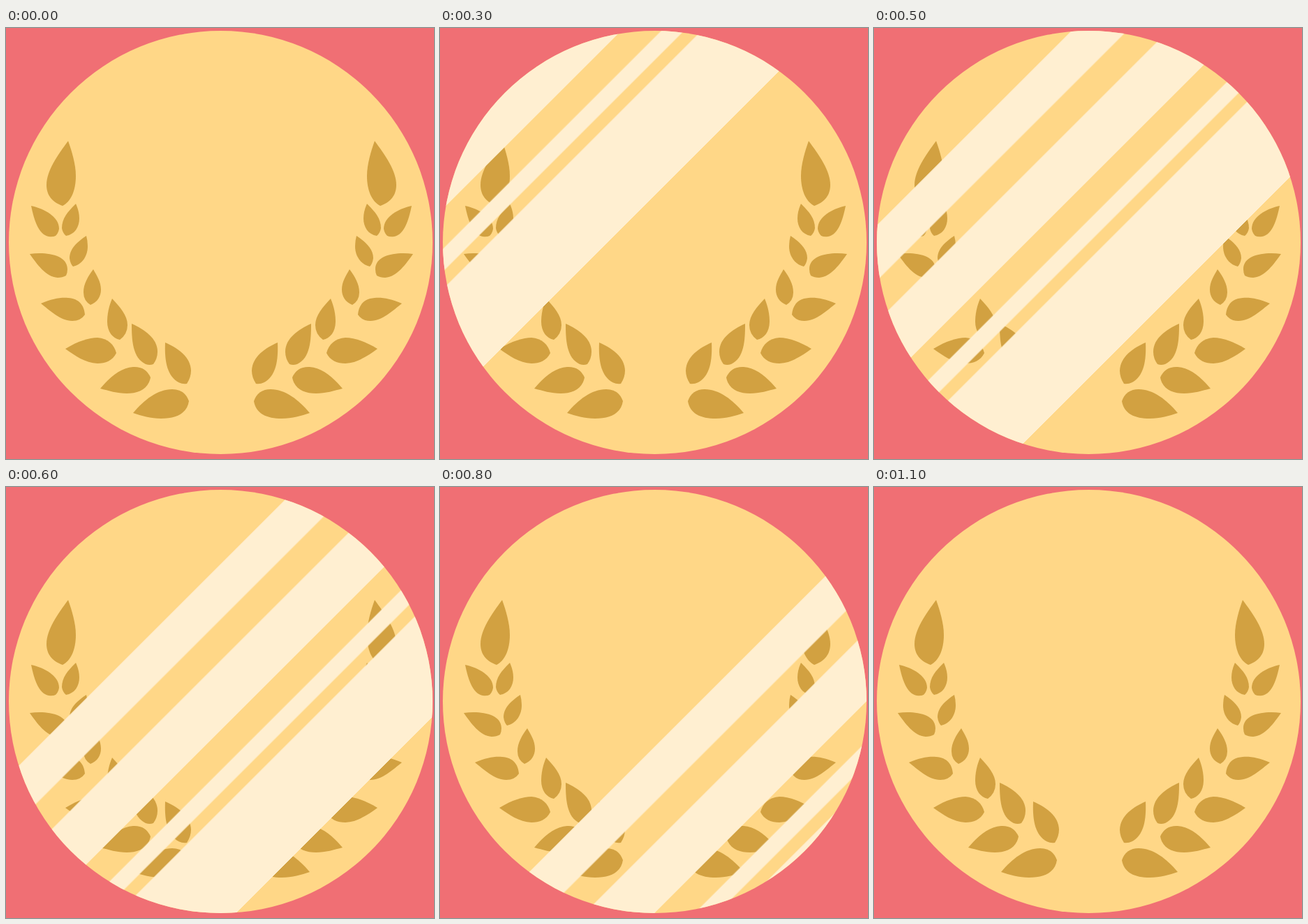
Write an HTML page that moves like this. It is 613 px wide and 618 px high and loops after 4100 ms.

```html
<!DOCTYPE html>
<html lang="en">
<head>
<meta charset="utf-8">
<title>Shining medal</title>
<style>
  html, body { margin: 0; width: 100%; height: 100%; overflow: hidden; background: #f06f74; }
  svg { display: block; width: 100%; height: 100%; }
  .coin { fill: #ffd787; }
  .laurel { fill: #d2a141; }
  .shine { fill: #ffefd1; animation: sweep 4100ms infinite; }

  /* eleven held steps of 100 ms, then a 3 s rest outside the coin */
  @keyframes sweep {
    0% { transform: translateX(153.6px); animation-timing-function: steps(11, end); }
    26.8293%, 100% { transform: translateX(1594px); }
  }
</style>
</head>
<body>
<svg viewBox="0 0 613 618">
  <defs>
    <clipPath id="face"><circle cx="307.5" cy="307.5" r="303.5"/></clipPath>
    <g id="branch">
      <path d="M89 162C74 182 58 205 58 225C58 243 70 251 81 255C93 249 100 233 100 212C100 195 94 176 89 162Z"/>
      <path d="M36 255C54 259 76 270 76 288Q75 294 71 298Q67 300 61 299C46 296 40 274 36 255Z"/>
      <path d="M100 252C90 262 80 272 80 287Q81 294 86 298C98 296 105 286 105 273Q105 263 100 252Z"/>
      <path d="M34 324C58 321 88 325 88 346Q88 351 86 355Q81 358 74 358C57 357 44 338 34 324Z"/>
      <path d="M115 298C103 306 91 316 91 330Q92 338 96 342C109 339 117 327 117 313Q117 305 115 298Z"/>
      <path d="M125 346C117 357 111 367 111 379Q111 391 121 397C131 393 136 385 136 375C136 364 130 355 125 346Z"/>
      <path d="M50 395C66 388 79 386 89 387C105 388 112 398 113 411Q107 420 95 420C78 420 63 405 50 395Z"/>
      <path d="M152 388C147 400 145 411 145 421C145 436 153 445 163 447Q174 439 174 426C174 412 163 400 152 388Z"/>
      <path d="M85 460C103 449 119 444 131 444C146 445 155 454 158 466C153 477 142 481 131 481C113 480 99 470 85 460Z"/>
      <path d="M180 424C180 447 181 473 200 482Q206 484 211 482Q217 474 217 464C217 445 198 432 180 424Z"/>
      <path d="M228 451C227 473 229 498 247 508Q253 511 259 510Q265 501 265 491C264 471 246 459 228 451Z"/>
      <path d="M135 517C149 500 165 487 182 486Q200 485 207 501C204 518 189 524 173 524C159 524 147 520 135 517Z"/>
      <path d="M182 552C198 533 217 518 238 518Q256 518 262 535C259 553 244 560 222 560C207 560 194 556 182 552Z"/>
    </g>
  </defs>

  <circle class="coin" cx="307.5" cy="307.5" r="303.5"/>
  <g class="laurel">
    <use href="#branch"/>
    <use href="#branch" transform="translate(617) scale(-1 1)"/>
  </g>

  <g clip-path="url(#face)">
    <!-- the local x axis runs down the diagonal and measures x + y -->
    <g transform="rotate(45) scale(.70711)">
      <g class="shine">
        <rect x="-168" y="-900" width="168" height="1800"/>
        <rect x="-225.5" y="-900" width="32.5" height="1800"/>
        <rect x="-383" y="-900" width="100" height="1800"/>
        <rect x="-521.5" y="-900" width="79.5" height="1800"/>
      </g>
    </g>
  </g>
</svg>
</body>
</html>
```
